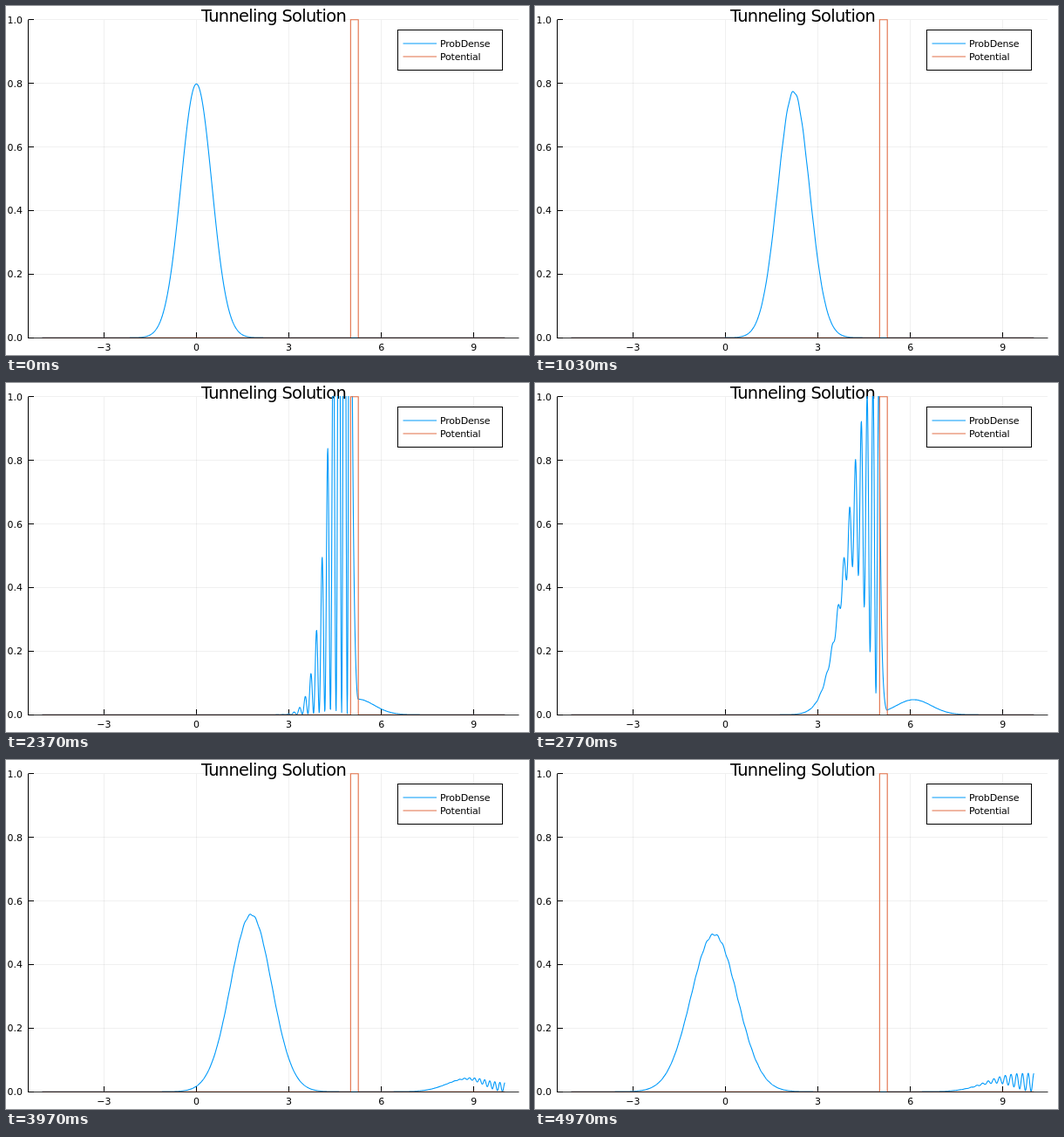
Write an HTML page that moves like this. It is 600x400 px and loops after 5.01 s.

```html
<!DOCTYPE html>
<html lang="en">
<head>
<meta charset="utf-8">
<title>Tunneling Solution</title>
<style>
  html, body { margin: 0; width: 100%; height: 100%; overflow: hidden; background: #fff; }
  svg { display: block; width: 600px; height: 400px; }
  text { font: 11px "DejaVu Sans", sans-serif; fill: #000; }
  .title { font-size: 19.4px; letter-spacing: -0.68px; }
  .key { letter-spacing: -0.2px; }
  path, rect { fill: none; stroke-width: 1; }
  .axis { stroke: #000; }
  .grid { stroke: #000; stroke-opacity: 0.06; }
  .density { stroke: #009afa; stroke-width: 1.1; stroke-linejoin: round; }
  .potential { stroke: #e26f46; stroke-width: 1.1; }
</style>
</head>
<body>
<svg viewBox="0 0 600 400">
  <clipPath id="area"><path d="M25 15H589V381H25Z"/></clipPath>
  <g id="axes"></g>
  <text class="title" x="307" y="18" text-anchor="middle">Tunneling Solution</text>
  <g clip-path="url(#area)">
    <path class="density" id="curve"/>
    <path class="potential" id="barrier"/>
  </g>
  <path class="axis" d="M25 380.5H588.5" stroke-opacity="0.8"/>
  <path class="axis" d="M25.5 15.5V381"/>
  <rect class="axis" x="449.5" y="27.5" width="120" height="46" style="fill:#fff"/>
  <path class="density" d="M455.5 43H494"/>
  <path class="potential" d="M455.5 58H494"/>
  <text class="key" x="498" y="47">ProbDense</text>
  <text class="key" x="498" y="62">Potential</text>
</svg>
<script>
const start = performance.now();
const $ = id => document.getElementById(id);
const px = x => 218.45 + 35.38 * x;
const py = p => 380.2 - 364.5 * p;
const snap = v => Math.floor(v) + 0.5;

function drawAxes() {
  let out = '';
  for (let x = -3; x <= 9; x += 3) {
    const u = snap(px(x));
    out += `<path class="grid" d="M${u} 16V380"/><path class="axis" d="M${u} 380V374"/>` +
      `<text x="${px(x)}" y="395" text-anchor="middle">${String(x).replace('-', '\u2212')}</text>`;
  }
  for (let n = 0; n <= 5; n++) {
    const v = snap(py(n / 5));
    out += `<path class="grid" d="M26 ${v}H588"/><path class="axis" d="M26 ${v}H32"/>` +
      `<text x="19" y="${py(n / 5) + 4}" text-anchor="end">${(n / 5).toFixed(1)}</text>`;
  }
  $('axes').innerHTML = out;
}

// Schrödinger equation (hbar = m = 1) on a grid with free ends
const FRAMES = 150, STEPS = 83;
const LEFT = -5, DX = 0.01, N = 1501, DT = 5e-5;
const K0 = 17.29, WALL = [5, 5.25], HEIGHT = 179;

const re = new Float64Array(N), im = new Float64Array(N), pot = new Float64Array(N);
for (let i = 0; i < N; i++) {
  const x = LEFT + i * DX;
  const a = Math.pow(2 / Math.PI, 0.25) * Math.exp(-x * x);
  re[i] = a * Math.cos(K0 * x);
  im[i] = a * Math.sin(K0 * x);
  pot[i] = x > WALL[0] + DX / 2 && x < WALL[1] - DX / 2 ? HEIGHT * DT : 0;
}

// to += sign * DT * H(from)
function kick(to, from, sign) {
  const c = sign * DT / (2 * DX * DX), last = N - 1;
  for (let i = 1; i < last; i++)
    to[i] += c * (2 * from[i] - from[i - 1] - from[i + 1]) + sign * pot[i] * from[i];
  to[0] += c * (from[0] - from[1]);
  to[last] += c * (from[last] - from[last - 1]);
}

function densityPath() {
  const pts = [];
  for (let i = 0; i < N; i++) {
    const p = re[i] * re[i] + im[i] * im[i];
    pts.push(px(LEFT + i * DX).toFixed(2) + ' ' + py(p).toFixed(2));
  }
  return 'M' + pts.join('L');
}

function simulate() {
  const paths = [densityPath()];
  while (paths.length < FRAMES) {
    for (let s = 0; s < STEPS; s++) {
      kick(re, im, 1);
      kick(im, re, -1);
    }
    paths.push(densityPath());
  }
  return paths;
}

drawAxes();
$('barrier').setAttribute('d',
  `M${px(-5)} ${py(0)}H${px(WALL[0])}V${py(1)}H${px(WALL[1])}V${py(0)}H${px(10)}`);
const paths = simulate();

// Steps last a thirtieth of a second, rounded to 10 ms
const LOOP = 5010;
let shown = -1;
function draw() {
  const t = Math.floor(((performance.now() - start) % LOOP) / 10) * 10;
  const k = Math.min(FRAMES - 1, Math.floor((t + 5) * 0.03));
  if (k !== shown) $('curve').setAttribute('d', paths[shown = k]);
  requestAnimationFrame(draw);
}
draw();
</script>
</body>
</html>
```
